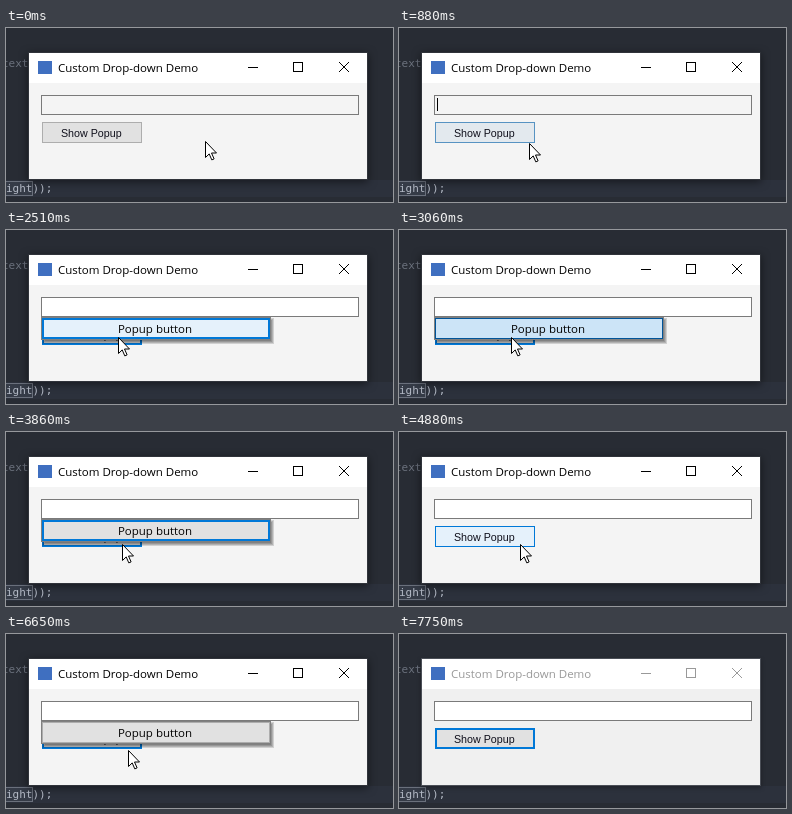
Animation, 387 px wide and 174 px high, one loop 7.85 s. Source, as an HTML page:

```html
<!DOCTYPE html>
<html lang="en">
<head>
<meta charset="utf-8">
<title>Custom Drop-down Demo</title>
<style>
  html, body { margin: 0; width: 100%; height: 100%; overflow: hidden; background: #282c34; }
  svg { display: block; width: 387px; height: 174px; }
  rect, .glyphs { shape-rendering: crispEdges; }
  .ui { font: 11.5px "Open Sans", "Noto Sans", sans-serif; }
  .small { font: 10.7px "Liberation Sans", sans-serif; }
  .code { font: 11px "DejaVu Sans Mono", monospace; }
</style>
</head>
<body>
<svg viewBox="0 0 387 174">
  <rect width="387" height="174" fill="#282c34"/>
  <rect y="152" width="387" height="17" fill="#2c313c"/>
  <text class="code" x="-4" y="39" fill="#6b717d">text</text>
  <rect x="-1.5" y="153.5" width="28" height="14" fill="#353b47" stroke="#6a707c"/>
  <text class="code" x="0" y="164" fill="#b4bac6">ight));</text>

  <rect id="frame" x="22.5" y="24.5" width="339" height="127"/>
  <rect x="23" y="25" width="338" height="30" fill="#fff"/>
  <rect id="client" x="23" y="55" width="338" height="96"/>
  <rect x="32" y="33" width="14" height="13" fill="#3f6fc0"/>
  <text id="title" class="ui" x="52" y="44">Custom Drop-down Demo</text>
  <g id="controls" fill="none">
    <path class="glyphs" d="M242 39.5h10M287.5 34.5h9v9h-9z"/>
    <path d="M333 34l10 10M343 34l-10 10"/>
  </g>

  <rect id="field" x="35.5" y="67.5" width="317" height="19"/>
  <rect id="caret" x="38" y="70" width="1" height="13" fill="#000"/>

  <g id="button">
    <rect/><rect fill="none"/>
    <text class="small" x="85.3" y="109" text-anchor="middle" fill="#10101c">Show Popup</text>
  </g>

  <g id="popup">
    <g id="shadow"></g>
    <rect x="35" y="87" width="230" height="23" fill="#808080"/>
    <g id="item">
      <rect/><rect fill="none"/>
      <text class="ui" x="149" y="103" text-anchor="middle" fill="#000">Popup button</text>
    </g>
  </g>

  <path id="cursor" d="M.5.5v16l3.7-3.6 2.6 6 2.3-1-2.6-5.9h5z" fill="#fff" stroke="#000"/>
</svg>
<script>
const $ = id => document.getElementById(id);
const set = (el, attrs) => {
  for (const name in attrs) el.setAttribute(name, attrs[name]);
};
const show = (el, on) => set(el, { visibility: on ? "visible" : "hidden" });

const DURATION = 7850;

// [fill, border colour, border width]
const looks = {
  normal:  ["#e1e1e1", "#adadad", 1],
  warming: ["#e3e9ee", "#5793c2", 1],
  hover:   ["#e5f1fb", "#0078d7", 1],
  hot:     ["#e5f1fb", "#0078d7", 2],
  pressed: ["#cce4f7", "#005499", 1],
  focused: ["#e1e1e1", "#0078d7", 2]
};

// Each step changes only the parts it names; item: null closes the popup.
const steps = [
  [0, { active: true, caret: false, field: "#7a7a7a", paper: "#f4f4f4",
        button: "normal", item: null, cursor: [199, 113] }],
  [430, { caret: true }],
  [740, { cursor: [169, 113] }],
  [880, { cursor: [130, 115], button: "warming" }],
  [1010, { cursor: [112, 114], button: "hover", caret: false }],
  [1160, { cursor: [112, 111] }],
  [1560, { button: "pressed", field: "#0078d7", paper: "#fff" }],
  [1680, { button: "focused", item: "normal", field: "#3d79a9" }],
  [1830, { field: "#7a7a7a" }],
  [2510, { item: "hot", cursor: [112, 107] }],
  [2630, { item: "hot" }],
  [3060, { item: "pressed" }],
  [3210, { item: "hot" }],
  [3860, { item: "focused", cursor: [116, 112] }],
  [3980, { cursor: [119, 118] }],
  [4100, { item: null, cursor: [121, 121] }],
  [4880, { button: "hover", cursor: [121, 112] }],
  [5030, { cursor: [121, 108] }],
  [5310, { button: "pressed" }],
  [5430, { button: "focused", item: "hot" }],
  [6650, { item: "normal", cursor: [122, 116] }],
  [6800, { cursor: [122, 119] }],
  [6950, { cursor: [122, 125] }],
  [7070, { cursor: [122, 129] }],
  [7190, { item: null }],
  [7750, { active: false, cursor: null }]
];

function paintButton(group, look, x, y, w, h) {
  const [fill, stroke, line] = looks[look];
  const [face, border] = group.children;
  set(face, { x, y, width: w, height: h, fill });
  set(border, { x: x + line / 2, y: y + line / 2, width: w - line, height: h - line,
                stroke, "stroke-width": line });
}

function paint(s) {
  const ink = s.active ? "#000" : "#999";
  set($("frame"), {
    fill: "#fff",
    stroke: s.active ? "#30333a" : "#4b4f57",
    style: `filter:drop-shadow(0 2px ${s.active ? 4 : 2}px rgba(0,0,0,${s.active ? .5 : .3}))`
  });
  set($("client"), { fill: s.active ? "#f4f4f4" : "#f0f0f0" });
  set($("title"), { fill: ink });
  set($("controls"), { stroke: ink });
  set($("field"), { fill: s.paper, stroke: s.field });
  show($("caret"), s.caret);
  paintButton($("button"), s.button, 36, 94, 100, 21);
  show($("popup"), s.item);
  if (s.item) paintButton($("item"), s.item, 36, 88, 228, 21);
  show($("cursor"), s.cursor);
  if (s.cursor) set($("cursor"), { transform: `translate(${s.cursor})` });
}

for (let i = 1; i <= 4; i++) {
  const layer = document.createElementNS("http://www.w3.org/2000/svg", "rect");
  set(layer, { x: 40 - i, y: 92 - i, width: 224 + 2 * i, height: 18 + 2 * i,
               fill: "#000", opacity: .15 });
  $("shadow").append(layer);
}

let last = -1;
function tick() {
  const time = performance.now() % DURATION;
  const count = steps.filter(([start]) => start <= time).length;
  if (count !== last) {
    paint(Object.assign({}, ...steps.slice(0, count).map(([, change]) => change)));
    last = count;
  }
  requestAnimationFrame(tick);
}
tick();
</script>
</body>
</html>
```
